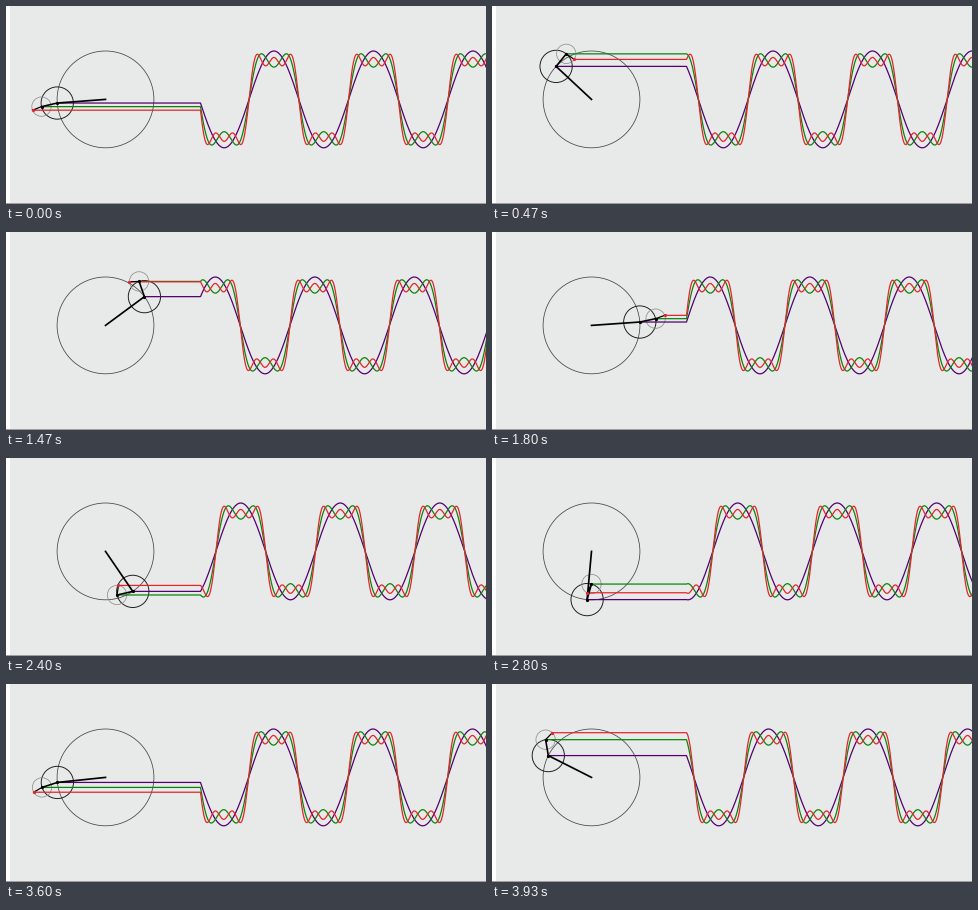
A matplotlib script that plays this animation: 480 px wide and 198 px high, repeating every 3.99 s.

```python
import numpy as np
import matplotlib.pyplot as plt
from matplotlib.animation import FuncAnimation
from matplotlib.patches import Circle, Rectangle

W, H, DPI = 480, 198, 100
FRAMES, LOOP = 60, 3990
CX, CY, R = 99, 92.9, 48.4
WAVE_X, PERIOD = 194, 99.5
HARMONICS = (1, 3, 5)
COLORS = ("#540070", "#0a850a", "#e4262c")
RINGS = (("#4a4a4a", 0.8), ("#1c1c1c", 0.95), ("#8c8c8c", 0.75))
ARMS = (1.7, 1.6, 1.2)

# The wheel turns clockwise with a slightly uneven pace.
KEY_FRAMES = (0, 7, 16, 27, 36, 48, 59)
KEY_ANGLES = (184.3, 137, 75.4, 4, -55.7, -134.7, -206.8)


def px(width):
    return width * 72 / DPI


fig = plt.figure(figsize=(W / DPI, H / DPI), dpi=DPI, facecolor="white")
ax = fig.add_axes([0, 0, 1, 1])
ax.set_xlim(-0.5, W - 0.5)
ax.set_ylim(H - 0.5, -0.5)
ax.axis("off")

ax.add_patch(Rectangle((3.5, -0.5), W, 197, fc="#e8eaea", lw=0, zorder=0))
ax.add_patch(Rectangle((-0.5, 196.5), W, 1, fc="#a39c9f", lw=0, zorder=0))

xs = np.arange(WAVE_X, W + 1, 0.5)
phase = 2 * np.pi * (xs - WAVE_X) / PERIOD

rings, arms, dots, waves = [], [], [], []
for i, (n, color) in enumerate(zip(HARMONICS, COLORS)):
    edge, width = RINGS[i]
    ring = Circle((CX, CY), R / n, fill=False, ec=edge, lw=px(width), zorder=2)
    rings.append(ax.add_patch(ring))
    waves += ax.plot([], [], color=color, lw=px(1.25), zorder=3 + i * 0.1)
    arms += ax.plot([], [], color="black", lw=px(ARMS[i]), zorder=4)
    dots += ax.plot([], [], "o", color="#e4262c" if n == 5 else "black",
                    ms=px(3.2), mew=0, zorder=5)


def update(frame):
    theta = np.radians(np.interp(frame, KEY_FRAMES, KEY_ANGLES))
    x, y = CX, CY
    curve = np.full_like(xs, CY)
    for n, ring, arm, dot, wave in zip(HARMONICS, rings, arms, dots, waves):
        ring.center = x, y
        tip_x = x + R / n * np.cos(n * theta)
        tip_y = y - R / n * np.sin(n * theta)
        arm.set_data([x, tip_x], [y, tip_y])
        dot.set_data([tip_x], [tip_y])
        curve = curve - R / n * np.sin(n * (theta + phase))
        wave.set_data(np.r_[tip_x, xs], np.r_[tip_y, curve])
        x, y = tip_x, tip_y
    return rings + arms + dots + waves


anim = FuncAnimation(fig, update, frames=FRAMES, interval=LOOP / FRAMES,
                     repeat=True, repeat_delay=0)
plt.show()
```
